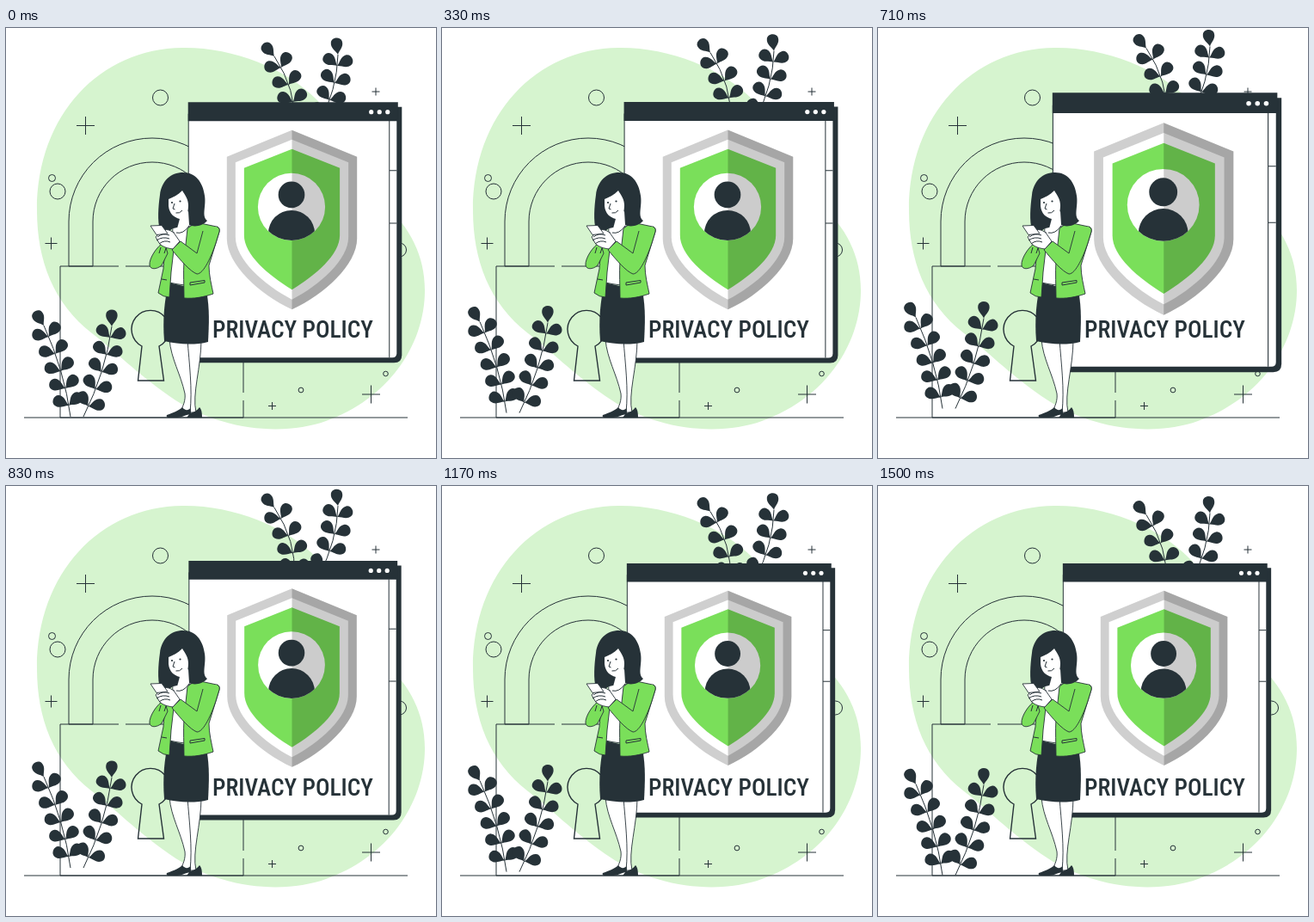
An HTML page that plays this animation: 500 px wide and 500 px high, repeating every 1540 ms.

```html
<!DOCTYPE html>
<html lang="en">
<head>
<meta charset="utf-8">
<title>Privacy policy</title>
<style>
  html, body { margin: 0; width: 100%; height: 100%; overflow: hidden; background: #fff; }
  svg { display: block; width: 100vw; height: 100vh; }
  .line { fill: none; stroke: #263238; stroke-width: 1; }
  .dark { fill: #263238; }
  .white { fill: #fff; }
  .skin { fill: #fff; stroke: #263238; stroke-width: .9; stroke-linejoin: round; }
  .cloth { fill: #7adf5a; stroke: #263238; stroke-width: .9; stroke-linejoin: round; }
  #label {
    fill: #263238; text-anchor: middle; font-size: 100px; font-weight: 500;
    font-family: "Roboto Condensed", Roboto, sans-serif; font-stretch: condensed;
  }
</style>
</head>
<body>
<svg viewBox="0 0 500 500">
  <path fill="#d6f4cf" d="M205 23C262 22 325 46 362 84C392 114 405 175 440 205C470 232 487 265 487 305C487 370 443 432 372 457C325 474 250 470 190 428C150 400 130 378 100 355C55 320 36 270 36 212C36 100 110 24 205 23Z"/>

  <!-- padlock -->
  <g class="line">
    <path d="M73 277V225A97 97 0 0 1 267 225M101 277V225A69 69 0 0 1 239 225M101 277H73"/>
    <path d="M131 277H63V453H276V433M276 424V277H139"/>
    <path stroke-width="1.4" d="M158 370A22 22 0 1 1 178 370L183.500 410H153.500Z"/>
  </g>

  <!-- rings and crosses -->
  <g class="line">
    <circle cx="179.500" cy="81" r="9"/>
    <circle cx="60" cy="190" r="9"/>
    <circle cx="53.500" cy="174.500" r="4"/>
    <circle cx="343" cy="421" r="2.900"/>
    <circle cx="441.500" cy="402" r="2.800"/>
    <circle cx="457.500" cy="258" r="8"/>
    <path d="M82 113.500h21m-10.500-10.500v21M45.500 250.500h14m-7-7v14M305 439.500h9m-4.500-4.500v9M414 426h21m-10.500-10.500v21M425.500 74h9m-4.500-4.500v9"/>
  </g>

  <g id="back"></g>

  <g id="window">
    <path class="dark" d="M217 92H460V380Q460 389 451 389H217Z"/>
    <path class="white" d="M212.500 100H454V378Q454 383 449 383H212.500Z"/>
    <path class="line" d="M212.500 100V383M445.500 108V383M445.500 166H454M445.500 227H454"/>
    <path class="dark" d="M212 86.500H455.500V108.500H212Z"/>
    <g class="white">
      <circle cx="424.500" cy="98" r="2.600"/>
      <circle cx="434" cy="98" r="2.600"/>
      <circle cx="443.500" cy="98" r="2.600"/>
    </g>
    <g id="shield"></g>
    <clipPath id="badge"><circle cx="332" cy="208" r="39"/></clipPath>
    <g class="dark" clip-path="url(#badge)">
      <circle cx="332" cy="194" r="15.300"/>
      <circle cx="332" cy="239" r="27"/>
    </g>
  </g>

  <text id="label" x="333.500">PRIVACY POLICY</text>

  <path class="line" d="M21 453H467"/>
  <g id="front"></g>

  <!-- woman -->
  <g>
    <path class="skin" d="M207 362C212 390 214 410 214 430L214 447H221C216 425 227 395 227 362Z"/>
    <path class="skin" d="M190 362C192 385 203 402 208 425C209 433 206 440 202 447H214C217 420 213 390 211 362Z"/>
    <path class="dark" d="M187 450C193 448 201 445 205 441C208 445 212 445 214.500 442L215 449C210 449 205 453 199 453H189C187 453 186 451 187 450ZM214 448C218 447 222 445 225 441C228 444 228 450 228 453H210Z"/>
    <path class="dark" d="M189 296L233 306C237 325 236 345 235 365C220 369 200 368 184 364C182 340 184 318 189 296Z"/>
    <path class="skin" d="M194 232L213 230L208 299Q199 298 190 296Z"/>
    <path class="cloth" d="M195 237C188 241 184 262 183 280L177 308Q183 313 190 313L192 284L195 258Z"/>
    <path class="cloth" d="M184 249C176 253 166 268 167 276C168 281 175 281 181 276L188 262Z"/>
    <path class="cloth" d="M211 233L221 226L245 231Q249 232 248 237L236 276C236 288 239 299 241 309C230 313 218 315 207 314C207 300 206 285 207 270Z"/>
    <path class="line" d="M214 296L231 293.500V296L214 299ZM181 292L187 293"/>
    <path class="cloth" d="M229 236L222 262L203 248L193 258C203 270 214 283 222 286C230 286 239 265 244 250L248 237Q249 232 245 231"/>
    <path class="dark" d="M206 168C191 168 181 178 179 194C177 208 176 224 179 235C184 238 190 237 194 233L212 229C220 232 229 230 234 224C227 219 233 207 231 195C229 179 220 168 206 168Z"/>
    <path class="white" d="M203 218L212 213L213 229C210 237 204 241 198 237Z"/>
    <path class="line" d="M198 238Q206 240 213 230"/>
    <path class="white" d="M189 199C194 197 200 194 205 189C208 194 212 199 212 206C212 216 209 224 202 222C195 220 190 216 189 207Z"/>
    <path class="line" d="M196 204L194 210L196.500 211M197.500 215Q202 216 205 212"/>
    <circle class="dark" cx="193" cy="203" r="1.100"/>
    <circle class="dark" cx="202.500" cy="201.500" r="1.100"/>
    <path class="skin" d="M181 236C186 233 191 235 195 238L202 248L194 257C188 256 182 255 178 250L174 243Z"/>
    <path class="skin" d="M168 230L181 229.500L188 239L175 240.500Z"/>
    <path class="line" d="M176 243Q182 238 190 241M175 247Q182 242 190 245M178 251Q184 246 191 249M180 255L178 262M186 256L184 262"/>
  </g>
</svg>
<script>
  const $ = id => document.getElementById(id);

  function add(parent, tag, attrs) {
    const el = document.createElementNS('http://www.w3.org/2000/svg', tag);
    for (const k in attrs) el.setAttribute(k, attrs[k]);
    return parent.appendChild(el);
  }

  // Leaf grown upwards from its root, then turned
  function leaf(g, x, y, turn) {
    add(g, 'path', {
      class: 'dark', transform: `translate(${x} ${y}) rotate(${turn})`,
      d: 'M0 0C-2 -5 -8 -8 -6.500 -15C-5 -21 5 -21 6.500 -15C8 -8 2 -5 0 0Z'
    });
  }

  // Curved stem from foot to tip, with leaf pairs every 20 px
  function sprig(g, foot, bend, tip, pairs) {
    const [fx, fy] = foot, [tx, ty] = tip, h = fy - ty;
    add(g, 'path', { class: 'line', d: `M${fx} ${fy}Q${bend} ${(fy + ty) / 2} ${tx} ${ty}` });
    const xAt = t => (1 - t) ** 2 * fx + 2 * t * (1 - t) * bend + t * t * tx;
    const lean = t => Math.atan2(2 * (1 - t) * (bend - fx) + 2 * t * (tx - bend), h) * 180 / Math.PI;
    leaf(g, tx, ty, lean(1) - 8);
    for (let i = 0; i < pairs; i++) {
      const drop = 13 + 20 * i, t = 1 - drop / h;
      for (const side of [-1, 1]) leaf(g, xAt(t), ty + drop, lean(t) + side * 57);
    }
  }

  sprig($('back'), [335, 112], 338, [312, 33], 4);
  sprig($('back'), [364, 112], 385, [386, 31], 4);
  sprig($('front'), [75, 452], 68, [44, 346], 5);
  sprig($('front'), [90, 452], 116, [123, 347], 5);

  // Shield layers shrink evenly; the right half is shaded
  function shield(inset) {
    const c = 332.5, w = 75.5 - inset, l = c - w, r = c + w, k = w * .5;
    const top = 119 + inset * 1.1, edge = 150 + inset * .65, low = 245 - inset * .2, tip = 327 - inset * 1.15;
    const b = low + (tip - low) * .36;
    return `M${c} ${top}L${r} ${edge}V${low}C${r} ${b} ${c + k} ${tip - 17} ${c} ${tip}` +
      `C${c - k} ${tip - 17} ${l} ${b} ${l} ${low}V${edge}Z`;
  }
  ['#cfcfcf', '#fff', '#7adf5a'].forEach((fill, i) => add($('shield'), 'path', { d: shield(10 * i), fill }));
  add($('shield'), 'circle', { class: 'white', cx: 332, cy: 208, r: 39 });
  const half = add($('shield'), 'clipPath', { id: 'half' });
  add(half, 'path', { d: 'M332.500 110H420V340H332.500Z' });
  add($('shield'), 'path', { d: shield(0), 'fill-opacity': .2, 'clip-path': 'url(#half)' });

  // Heading sized to its column
  const size = 18700 / $('label').getComputedTextLength();
  $('label').style.fontSize = size + 'px';
  $('label').setAttribute('y', 350 + size * .357);

  // Motion: a double heartbeat and a slow float
  const LOOP = 1540, CYCLE = 1500, LEAD = 38;
  const clamp = v => Math.max(0, Math.min(1, v));
  const tent = (p, from, peak, to) => clamp(Math.min((p - from) / (peak - from), (to - p) / (to - peak)));

  function draw(now) {
    const p = Math.min(now % LOOP + LEAD, CYCLE) / CYCLE;
    const beat = tent(p, 0, .1, .3) + tent(p, .4, .5, .6);
    const scale = .977 * (1 + .1 * beat);
    const lift = .5 - 10 * tent(p, 0, .5, 1);
    $('window').setAttribute('transform', `translate(336 237.5) scale(${scale}) translate(-336 -237.5)`);
    for (const id of ['back', 'front']) $(id).setAttribute('transform', `translate(0 ${lift})`);
  }

  const start = performance.now();
  function tick() {
    draw(performance.now() - start);
    requestAnimationFrame(tick);
  }
  tick();
</script>
</body>
</html>
```
